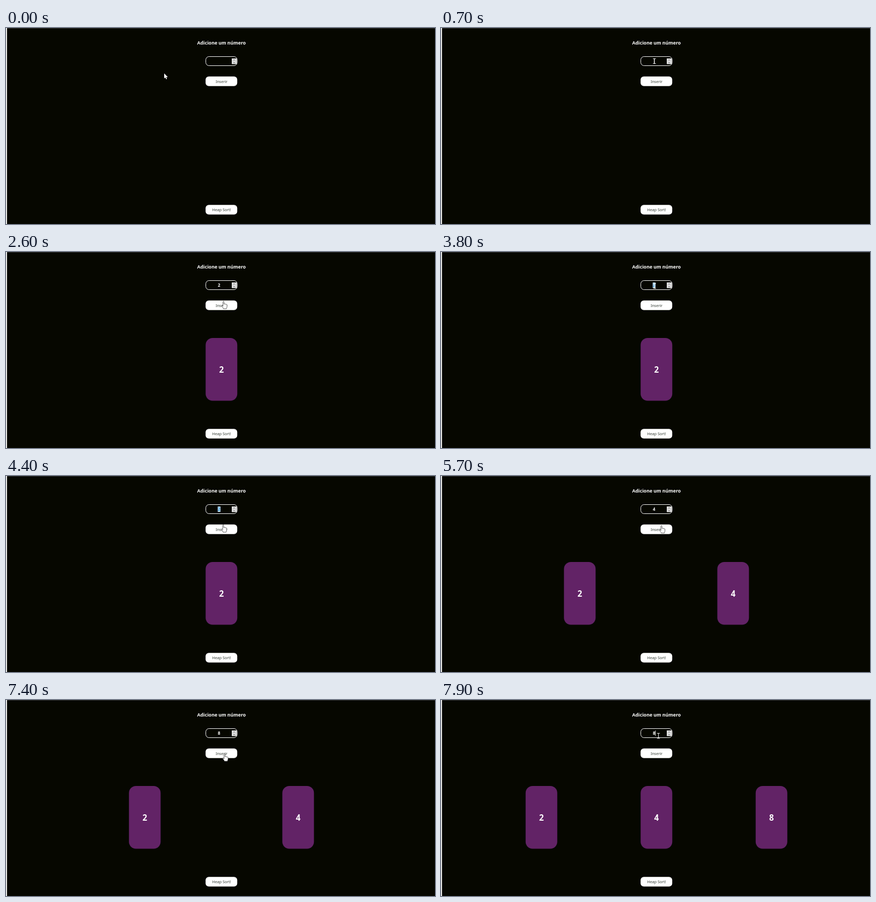
These frames come from a looping animation (800 px wide and 367 px high, 8000 ms). An HTML page:

```html
<!DOCTYPE html>
<html lang="pt">
<head>
<meta charset="utf-8">
<style>
  html, body { margin: 0; width: 100%; height: 100%; overflow: hidden; background: #060700; }
  svg { display: block; width: 800px; height: 367px; font-family: "Noto Sans", sans-serif; }
  text { text-anchor: middle; fill: #fff; }
  .title { font-size: 8.7px; font-weight: 600; }
  .label { font-size: 7.1px; fill: #343c34; }
  .button { fill: #fff; }
  .card rect { fill: #622366; }
  .card text { font-size: 15.2px; font-weight: 600; }
  #value { font-size: 8px; font-weight: 600; }
</style>
</head>
<body>
<svg viewBox="0 0 800 367">
  <rect width="800" height="367" fill="#060700"/>
  <rect width="800" height="1" fill="#303030"/>
  <rect width="1.8" height="367" fill="#fff"/>
  <text class="title" x="401.8" y="31">Adicione um número</text>

  <rect x="372.6" y="53.5" width="58.4" height="17" rx="6" fill="none" stroke="#f4f4f4"/>
  <rect x="421" y="57" width="9.6" height="10.6" fill="#dedede"/>
  <path d="M423.8 60.9l1.7-1.7 1.7 1.7M423.8 63.8l1.7 1.7 1.7-1.7" fill="none" stroke="#555" stroke-width=".9"/>
  <rect id="mark" x="394.8" y="57.2" width="5.2" height="10" fill="#c4e4fa"/>
  <text id="value" x="397.3" y="65.1"></text>
  <rect id="caret" y="57.2" width=".9" height="10" fill="#fff"/>

  <rect class="button" x="372.2" y="90.8" width="59" height="18" rx="6"/>
  <text class="label" x="402" y="102.5">Inserir</text>
  <rect class="button" x="372.2" y="331.2" width="59" height="18" rx="6"/>
  <text class="label" x="402" y="342.9">Heap Sort!</text>

  <g id="cards"></g>

  <g id="cursor" stroke-linejoin="round" stroke-linecap="round">
    <path id="arrow" d="M0 0V9.6L2.2 7.6L3.7 11L5.2 10.3L3.8 7H6.8Z" fill="#fff"/>
    <path id="hand" d="M-1.1.8C-1.1-.5 1-.5 1 .8V5.2C1.3 4.4 2.9 4.5 3 5.5C3.4 4.8 4.8 5 4.9 5.9C5.4 5.4 6.6 5.7 6.6 6.8V9.6C6.6 11.6 5.6 12.2 5.5 13.8H-.2C-.4 12.2-2.4 10.5-3.2 8.8C-3.8 7.6-2.4 7-1.1 8.7Z"
      fill="#fff" stroke="#222" stroke-width=".7"/>
    <path id="beam" d="M-2.3-4.6H2.3M0-4.6V4.6M-2.3 4.6H2.3" fill="none" stroke="#fff" stroke-width=".9"/>
  </g>
</svg>
<script>
  const LOOP = 8000, STEP = 100;
  const MID = 401.8, CARD = 59, ROW = 799;
  const SELECT_DELAY = 200, INSERT_DELAY = 300;
  const $ = id => document.getElementById(id);
  const show = (el, on) => el.setAttribute('visibility', on ? 'visible' : 'hidden');
  const ease = k => k * k * (3 - 2 * k);

  // each round: focus the field, type a digit, insert it as a card
  const rounds = [
    { digit: 2, focus: 700, type: 1200, insert: 2400 },
    { digit: 4, focus: 2900, type: 5200, insert: 5700 },
    { digit: 8, focus: 5900, type: 6400, insert: 7500 },
    { focus: 7900, type: Infinity, insert: Infinity }
  ];

  // eased pointer moves: start, end, x, y
  const home = [295, 85];
  const moves = [
    [0, 600, 398, 62], [1200, 1800, 420, 123], [1800, 2200, 407, 98],
    [2500, 2900, 398, 62], [3700, 4400, 405, 91.4], [5300, 5500, 411, 93],
    [5700, 6000, 399, 63], [6800, 7400, 407.5, 101], [7400, 7700, 405.5, 67]
  ];

  $('cards').innerHTML = rounds.filter(r => r.digit).map(r =>
    `<g class="card"><rect x="${-CARD / 2}" y="161" width="${CARD}" height="117.6" rx="13"/><text y="225.7">${r.digit}</text></g>`).join('');
  const cards = [...$('cards').children];

  function drawCursor(t) {
    let [x, y] = home;
    for (const [from, to, nx, ny] of moves) {
      const k = ease(Math.min(1, Math.max(0, (t - from) / (to - from))));
      x += (nx - x) * k;
      y += (ny - y) * k;
    }
    const over = (top, bottom) => Math.abs(x - MID) < CARD / 2 && y > top && y < bottom;
    const kind = over(53, 71) ? 'beam' : over(91, 109) ? 'hand' : 'arrow';
    $('cursor').setAttribute('transform', `translate(${x} ${y})`);
    for (const id of ['arrow', 'hand', 'beam']) show($(id), id === kind);
  }

  function drawField(t) {
    const value = rounds.findLast(r => r.type <= t)?.digit ?? '';
    const round = rounds.findLast(r => r.focus <= t);
    const selected = value && round && t >= round.focus + SELECT_DELAY && t < round.type;
    const caret = round && !selected && t < round.insert - INSERT_DELAY;
    $('value').textContent = value;
    $('value').style.fill = selected ? '#2580c4' : '#fff';
    $('caret').setAttribute('x', value ? 399.4 : 397.2);
    show($('mark'), selected);
    show($('caret'), caret);
  }

  // evenly spaced row, equal gaps at both ends
  function drawCards(t) {
    const count = rounds.filter(r => r.insert <= t).length;
    const pitch = CARD + (ROW - count * CARD) / (count + 1);
    cards.forEach((card, i) => {
      show(card, i < count);
      card.setAttribute('transform', `translate(${MID + (i - (count - 1) / 2) * pitch} 0)`);
    });
  }

  const start = performance.now();
  function tick() {
    const now = (performance.now() - start) % LOOP;
    const t = Math.floor(now / STEP) * STEP;
    drawField(t);
    drawCards(t);
    drawCursor(t);
    requestAnimationFrame(tick);
  }
  tick();
</script>
</body>
</html>
```
